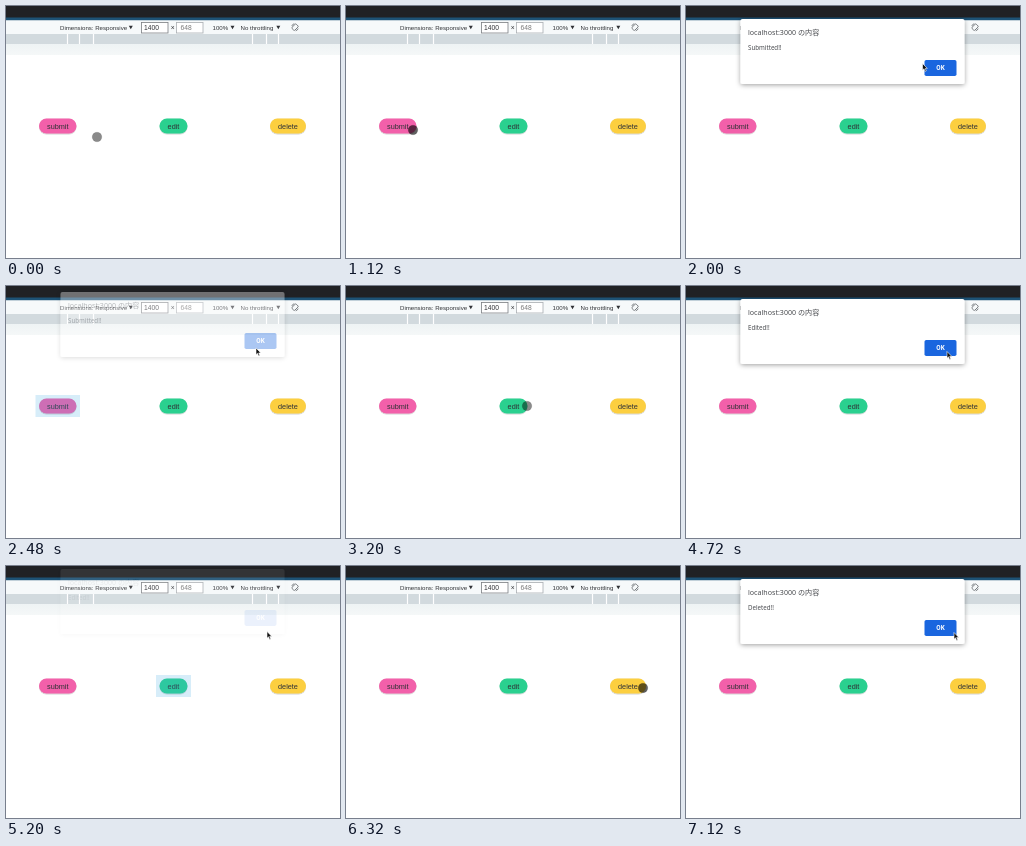
These frames come from a looping animation (334x252 px, 7.2 s). An HTML page:

```html
<!DOCTYPE html>
<html lang="en">
<head>
<meta charset="utf-8">
<title>Buttons with alerts</title>
<style>
html, body { margin: 0; width: 100%; height: 100%; overflow: hidden; background: #fff; }
svg { display: block; width: 334px; height: 252px; }
text { font-family: "Liberation Sans", Arial, sans-serif; fill: #303236; }
.bar { font-size: 6.1px; }
.size { font-size: 6.7px; }
.label { font-size: 7.3px; text-anchor: middle; }
#dialog text { font-family: "Noto Sans", "Noto Sans CJK JP", sans-serif; fill: #4a4c50; }
#dialog .ok { font: bold 6.3px Roboto, sans-serif; fill: #fff; text-anchor: middle; }
</style>
</head>
<body>
<svg viewBox="0 0 334 252">
  <defs>
    <linearGradient id="fade" x2="0" y2="1">
      <stop stop-color="#eef3f4"/><stop offset="1" stop-color="#f5f8f8"/>
    </linearGradient>
    <filter id="soft" x="-20%" y="-40%" width="140%" height="200%">
      <feDropShadow dx="0" dy="1" stdDeviation="2.5" flood-opacity=".38"/>
    </filter>
    <filter id="lift" x="-20%" y="-30%" width="140%" height="180%">
      <feDropShadow dx="0" dy=".6" stdDeviation=".7" flood-opacity=".3"/>
    </filter>
  </defs>

  <rect width="334" height="252" fill="#fff"/>
  <rect width="334" height="12" fill="#202124"/>
  <rect y="11.5" width="334" height="3" fill="#1d5275"/>
  <rect y="14.5" width="334" height="14" fill="#f6f9fa"/>
  <rect y="28" width="334" height="10" fill="#d2dade"/>
  <path d="M61.500 28v10M73.500 28v10M87.500 28v10M246.500 28v10M260.500 28v10M272.500 28v10" stroke="#fff" stroke-width="1.2"/>
  <rect y="38" width="334" height="11" fill="url(#fade)"/>

  <text class="bar" x="54" y="23.500">Dimensions: Responsive</text>
  <text class="bar" x="206.500" y="23.500">100%</text>
  <text class="bar" x="234.500" y="23.500">No throttling</text>
  <path d="M122.800 19.800h4l-2 3.400zM224.500 19.800h4l-2 3.400zM270.300 19.800h4l-2 3.400z" fill="#303236"/>
  <g fill="#fff" stroke="#7b7e82" stroke-width=".8">
    <rect x="135.500" y="16.500" width="26.500" height="10.500"/>
    <rect x="170.500" y="16.500" width="26.500" height="10.500" stroke="#a9adb1"/>
  </g>
  <text class="size" x="138" y="24.300">1400</text>
  <text class="size" x="164.700" y="24">×</text>
  <text class="size" x="174.500" y="24.300" style="fill:#777">648</text>
  <g fill="none" stroke="#63676b" stroke-width=".8">
    <rect x="287" y="18.200" width="4" height="6" rx=".8" transform="rotate(45 289 21.200)"/>
    <path d="M285.800 20a3.500 3.500 0 0 1 2.500-2.300M292.200 22.500a3.500 3.500 0 0 1-2.500 2.300"/>
  </g>

  <g id="buttons"></g>
  <rect id="tap" y="109" height="22" fill="#3aa5e0" fill-opacity=".2"/>

  <g id="dialog">
    <rect x="54.500" y="13" width="224" height="65" rx="2" fill="#fff" filter="url(#soft)"/>
    <text x="62" y="29" font-size="7.100">localhost:3000 の内容</text>
    <text id="message" x="62" y="43.800" font-size="6.200"></text>
    <rect x="238.500" y="54" width="32" height="16" rx="1.800" fill="#1a66df"/>
    <text class="ok" x="254.500" y="64.300">OK</text>
  </g>

  <circle id="touch" r="4.800" stroke="#000" stroke-opacity=".18" stroke-width=".6"/>
  <path id="arrow" d="M0 0V6.700L1.500 5.300L2.600 7.900L3.800 7.400L2.700 4.900H4.800Z" fill="#111" stroke="#fff" stroke-width=".6"/>
</svg>

<script>
const LOOP = 7200, STEP = 80;
const $ = id => document.getElementById(id);
const clamp = v => Math.max(0, Math.min(1, v));

const buttons = [
  { label: "submit", x: 33, w: 37.5, fill: "#f261aa" },
  { label: "edit", x: 153.5, w: 28, fill: "#2bd08f" },
  { label: "delete", x: 264, w: 36, fill: "#fccf40" }
];

// One alert per button: finger press, dialog opening and closing times.
const alerts = [
  { message: "Submitted!!", press: 1100, open: 1220, close: 2365 },
  { message: "Edited!!", press: 3430, open: 3620, close: 5035 },
  { message: "Deleted!!", press: 6220, open: 6340, close: Infinity }
];

// Pointer stops: time, x, y.
const path = [
  [0, 91, 131], [560, 91, 131], [1060, 67, 124], [1520, 67, 124],
  [2000, 236.5, 57.5], [2240, 250, 62], [2560, 250, 62],
  [3120, 181, 120], [4080, 181.5, 119.5], [4640, 261, 65.5],
  [5280, 261, 65.5], [5920, 297, 122], [6500, 297, 122],
  [7040, 268, 66.5], [LOOP, 268, 66.5]
];

$("buttons").innerHTML = buttons.map(b => `
  <rect x="${b.x}" y="112.500" width="${b.w}" height="15" rx="7.500" fill="${b.fill}" filter="url(#lift)"/>
  <text class="label" x="${b.x + b.w / 2}" y="122.500">${b.label}</text>`).join("");

function pointerAt(t) {
  const i = path.findIndex(p => p[0] > t);
  const [t0, x0, y0] = path[i - 1], [t1, x1, y1] = path[i];
  const p = (t - t0) / (t1 - t0), e = p * p * (3 - 2 * p);
  return [x0 + (x1 - x0) * e, y0 + (y1 - y0) * e];
}

function draw(t) {
  const now = alerts.findIndex(a => t >= a.press && t < a.close + 560);
  const a = alerts[now];
  const shown = a ? clamp((t - a.open) / 120) * (1 - clamp((t - a.close) / 180)) : 0;
  $("dialog").setAttribute("opacity", shown);
  $("dialog").setAttribute("transform", `translate(0 ${-11 * (1 - shown)})`);
  $("message").textContent = a ? a.message : "";

  const tapped = a && t >= a.close && t < a.close + 330;
  $("tap").setAttribute("visibility", tapped ? "visible" : "hidden");
  if (tapped) {
    $("tap").setAttribute("x", buttons[now].x - 3.5);
    $("tap").setAttribute("width", buttons[now].w + 7);
  }

  const [x, y] = pointerAt(t);
  const arrow = a && t >= a.open && t < a.close + 220;
  const pressed = a && t < a.open;
  $("arrow").setAttribute("transform", `translate(${x} ${y})`);
  $("arrow").setAttribute("visibility", arrow ? "visible" : "hidden");
  $("touch").setAttribute("transform", `translate(${x} ${y})`);
  $("touch").setAttribute("visibility", arrow ? "hidden" : "visible");
  $("touch").setAttribute("fill-opacity", pressed ? .62 : .46);
}

const start = performance.now();
function tick() {
  const t = (performance.now() - start) % LOOP;
  draw(Math.floor(t / STEP) * STEP);
  requestAnimationFrame(tick);
}
tick();
</script>
</body>
</html>
```
